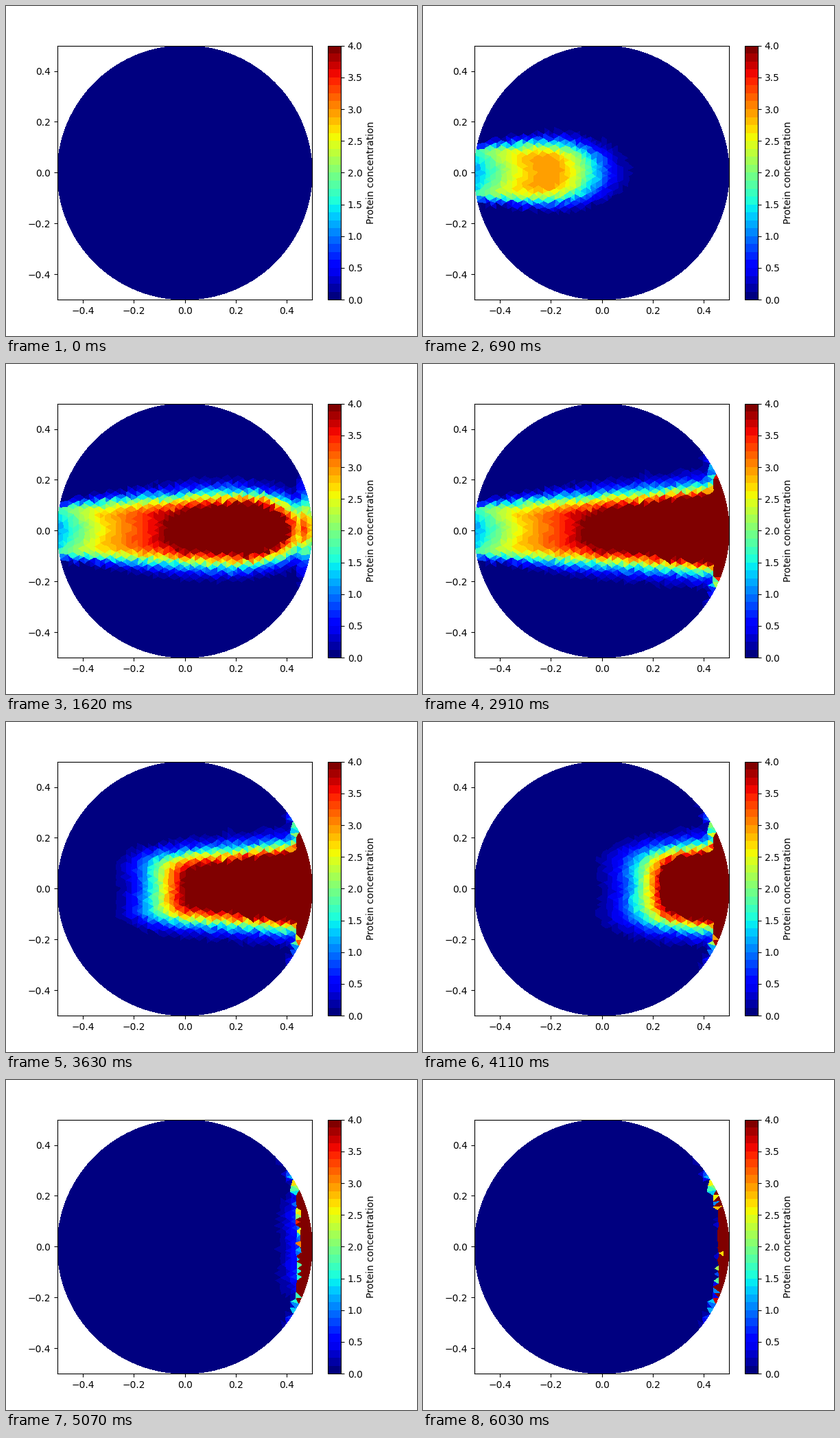
Recreate the animation shown at these times as a matplotlib script. Size 599 by 480 pixels, loop 6060 ms.

```python
import numpy as np
import matplotlib.pyplot as plt
from matplotlib.animation import FuncAnimation
from matplotlib.tri import Triangulation

W, H, DPI = 599, 480, 100
STEP = 30               # ms per frame
FRAMES = 202
RADIUS = 0.5
EDGE = 0.024            # mesh edge length
RATE = 0.366            # flux that sets the drift speed
INFLOW_ON, INFLOW_OFF = 0.335, 3.335

rng = np.random.default_rng(4)


def disc_mesh():
    """Triangulated disc: jittered hexagonal lattice inside a boundary ring."""
    n = int(RADIUS / EDGE) + 4
    i, j = np.meshgrid(np.arange(-2 * n, 2 * n + 1), np.arange(-2 * n, 2 * n + 1))
    x = (i * EDGE * np.sqrt(3) / 2).ravel()
    y = ((j + i / 2) * EDGE).ravel()
    keep = np.hypot(x, y) < RADIUS - 0.7 * EDGE
    x, y = x[keep], y[keep]
    x = x + rng.uniform(-0.12, 0.12, x.size) * EDGE
    y = y + rng.uniform(-0.12, 0.12, y.size) * EDGE
    a = np.linspace(0, 2 * np.pi, 136, endpoint=False)
    return Triangulation(np.r_[x, RADIUS * np.cos(a)], np.r_[y, RADIUS * np.sin(a)])


def ramp(z):
    """Smooth step close to the normal distribution function."""
    z = np.clip(z, -6, 6)
    return 1 / (1 + np.exp(-1.5976 * z - 0.0706 * z ** 3))


def axis_level(x):
    """Steady concentration along the centre line."""
    return np.interp(x, [-0.5, -0.45, -0.4, -0.35, -0.3, -0.2, -0.13, -0.05, 0, 0.1, 0.2, 0.4, 0.5],
                     [1.15, 1.5, 1.95, 2.4, 2.75, 3.2, 3.55, 4.05, 4.4, 4.9, 5.6, 8.0, 8.8])


def half_width(x):
    return np.interp(x, [-0.5, -0.3, 0, 0.4], [0.1, 0.108, 0.125, 0.13])


def blur(x):
    """Width of a travelling edge that has reached x."""
    return np.interp(x, [-0.5, -0.3, 0, 0.22, 0.5], [0.02, 0.065, 0.1, 0.108, 0.085])


# Travel time from the inlet; the flow slows down as the plume gets denser.
path = np.linspace(-0.5, 2.5, 3001)
travel = np.cumsum(axis_level(path) * half_width(path)) * (path[1] - path[0]) / RATE


def reach(age):
    return np.interp(age, travel, path)


mesh = disc_mesh()
corners = mesh.triangles
cx = mesh.x[corners].mean(axis=1) + rng.normal(0, 0.0035, len(corners))
cy = mesh.y[corners].mean(axis=1) + rng.normal(0, 0.0035, len(corners))

# Steady plume
yc = cy - 0.008 * np.clip(cx + 0.5, 0, 1)
bend = 10 * np.minimum(yc ** 2, 0.012) * np.clip((-0.05 - cx) / 0.15, 0, 1)
spread = 0.004 + 0.047 * np.sqrt(np.clip(cx + 0.5, 0, 1) / 0.9)
plume = axis_level(cx + bend) * ramp((half_width(cx) - np.abs(yc)) / spread)

# Layer that piles up at the right wall
yw = cy - 0.01
wall_share = ramp((0.13 - np.abs(yw)) / 0.075)
rim = np.sqrt(RADIUS ** 2 - np.minimum(cy ** 2, 0.2)) - 0.012


def concentration(k):
    t = k * STEP / 1000
    if t < INFLOW_ON:
        return np.zeros(len(corners))
    front = reach(t - INFLOW_ON)
    c = plume * ramp((front - 5 * yc ** 2 - cx) / blur(front))
    if t > INFLOW_OFF:
        tail = reach(t - INFLOW_OFF)
        c = c * ramp((cx - tail + 2 * yc ** 2) / blur(tail))
    stored = 11 * np.clip(t - 1.5, 0, 3.4)
    inner = 0.456 + 0.014 * np.clip((t - 4.7) / 1.3, 0, 1)
    edge = np.minimum(inner - 0.45 * cy ** 2, rim)
    return c + stored * wall_share * ramp((cx - edge) / 0.006)


fig, ax = plt.subplots(figsize=(W / DPI, H / DPI), dpi=DPI)
cells = ax.tripcolor(mesh, facecolors=concentration(0), cmap=plt.get_cmap("jet", 32),
                     vmin=0, vmax=4)
ax.set_xlim(-0.5, 0.5)
ax.set_ylim(-0.5, 0.5)
ticks = [-0.4, -0.2, 0, 0.2, 0.4]
ax.set_xticks(ticks)
ax.set_yticks(ticks)
fig.colorbar(cells, ax=ax, label="Protein concentration", ticks=np.arange(0, 4.1, 0.5))


def draw(k):
    cells.set_array(concentration(k))
    return [cells]


anim = FuncAnimation(fig, draw, frames=FRAMES, init_func=lambda: draw(0),
                     interval=STEP, repeat=True, repeat_delay=0, blit=False)
plt.show()
```
